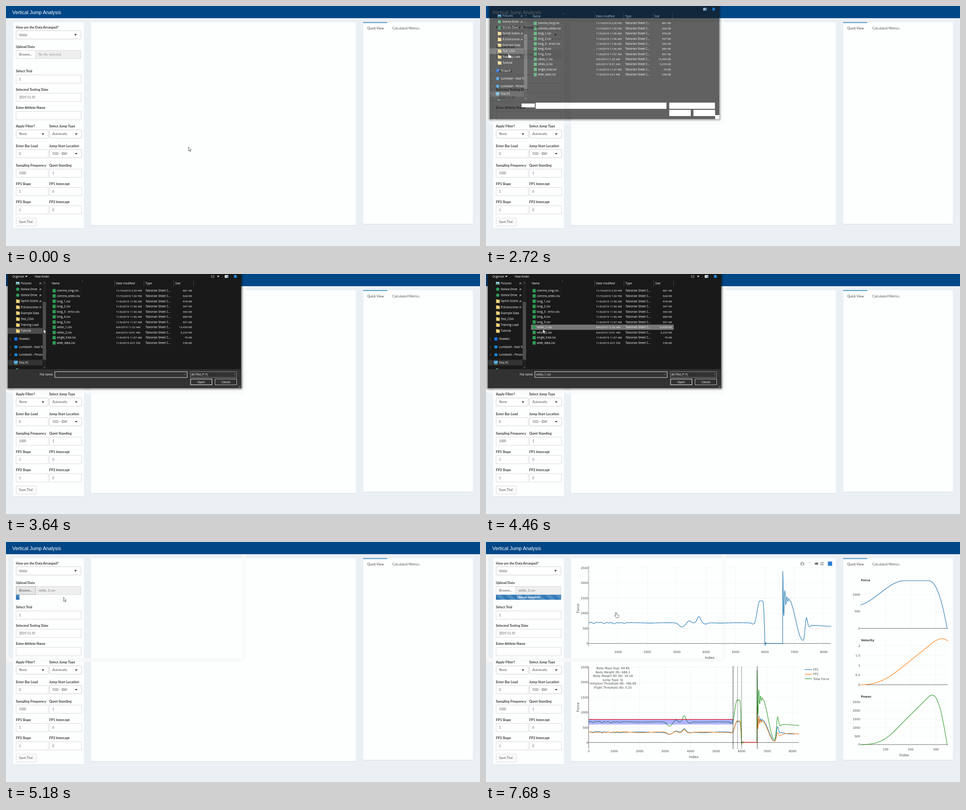
Animation, 1053 px wide and 532 px high, one loop 8000 ms. Source, as an HTML page:

```html
<!DOCTYPE html>
<html lang="en">
<head>
<meta charset="utf-8">
<title>Vertical Jump Analysis</title>
<style>
html, body { margin: 0; width: 100%; height: 100%; overflow: hidden; background: #ebf0f4; }
svg { display: block; }
text { font: 7.4px Lato, sans-serif; fill: #555; }
.label { font-weight: 700; font-size: 7.5px; fill: #333; }
.num { font-size: 6.7px; }
.title { font: 10.9px "Liberation Sans", Arial, sans-serif; fill: #fff; }
.done { font-weight: 700; font-size: 6.7px; fill: #fff; }
.plot text { font: 6.58px "DejaVu Sans", sans-serif; fill: #444; }
.plot .axis { font-size: 7.68px; }
.plot .head { font-weight: 700; fill: #333; }
.win text { font: 6.3px "Open Sans", sans-serif; fill: #fff; }
.win .date { font-size: 6.15px; }
.mid { text-anchor: middle; }
.end { text-anchor: end; }
</style>
</head>
<body>
<svg id="stage" width="1053" height="532" viewBox="0 0 1053 532"></svg>
<script>
const LOOP = 8000;
const text = (x, y, s, cls = '', more = '') => `<text x="${x}" y="${y}" class="${cls}" ${more}>${s}</text>`;
const rect = (x, y, w, h, fill = '#fff', more = '') =>
  `<rect x="${x}" y="${y}" width="${w}" height="${h}" fill="${fill}" ${more}/>`;
const path = (d, stroke, width = 1, more = '') =>
  `<path d="${d}" fill="none" stroke="${stroke}" stroke-width="${width}" ${more}/>`;
const caret = (x, y, fill = '#222') => `<path d="M${x - 3} ${y - 1.5}h6l-3 3.2z" fill="${fill}"/>`;
const group = (id, body, more = '') => `<g id="${id}" ${more}>${body}</g>`;
const range = (a, b, step) => Array.from({ length: Math.floor((b - a) / step + 1e-6) + 1 }, (_, i) => a + i * step);
const clamp = v => Math.max(0, Math.min(1, v));
const smooth = (a, b, x) => { const u = clamp((x - a) / (b - a)); return u * u * (3 - 2 * u); };
const bell = (x, center, width) => Math.exp(-(((x - center) / width) ** 2));

// ---- Form ----
const panel = (x, y, w, h) => rect(x, y + .8, w, h, '#d3d9de') + rect(x, y, w, h, '#fdfefe');
const field = (x, w, y, value, select) =>
  rect(x + .5, y - 9.2, w - 1, 18.4, '#fff', select ? 'stroke="#bfc1c4" stroke-width=".8" rx="2"' : 'stroke="#d2d6de" stroke-width=".9"') +
  text(x + 7, y + 2.5, value, /^[\d-]+$/.test(value) ? 'num' : '') +
  (select ? caret(x + w - 12.5, y) : '');
const label = (x, y, s) => text(x, y + 2.6, s, 'label');
const pair = (y, a, b, left, right, selA, selB) =>
  label(22, y, a) + label(96, y, b) + field(22, 72.5, y + 17.4, left, selA) + field(96, 72.5, y + 17.4, right, selB);

const panels = panel(16, 36, 157, 457) + panel(189, 36, 588, 450) + panel(793.5, 36, 243.5, 447);

const form =
  rect(0, 0, 1053, 27, '#004787') + text(14, 17.6, 'Vertical Jump Analysis', 'title') +
  rect(793.5, 35.8, 53.5, 1.8, '#3c8dbc') +
  text(802.5, 51.6, 'Quick View', '', 'style="fill:#444"') + text(858, 51.6, 'Calculated Metrics') +
  label(22, 47, 'How are the Data Arranged?') + field(22, 145, 64, 'Veldo', true) +
  label(22, 90, 'Upload Data') +
  rect(65.5, 98.5, 101, 18, '#eee', 'stroke="#d2d6de" stroke-width=".9"') +
  rect(22.5, 98.5, 43, 18, '#fff', 'id="browse" stroke-width=".9"') +
  text(29, 110.4, 'Browse...') + text(72, 110.4, '', '', 'id="upload"') +
  label(22, 144.5, 'Select Trial') + field(22, 145.5, 162, '1') +
  label(22, 185, 'Selected Testing Date') + field(22, 145.5, 202.5, '2019-11-19') +
  label(22, 225.7, 'Enter Athlete Name') + field(22, 145.5, 243, '') +
  pair(266.5, 'Apply Filter?', 'Select Jump Type', 'None', 'Automatic', true, true) +
  pair(310, 'Enter Bar Load', 'Jump Start Location', '0', '5SD - BW', false, true) +
  pair(353.2, 'Sampling Frequency', 'Quiet Standing', '1000', '1') +
  pair(394, 'FP1 Slope', 'FP1 Intercept', '1', '0') +
  pair(434.6, 'FP2 Slope', 'FP2 Intercept', '1', '0') +
  rect(22.5, 469.8, 44.6, 18, '#fbfbfb', 'rx="2" stroke="#d9d9d9" stroke-width=".9"') + text(29, 481.4, 'Save Trial') +
  group('progress', rect(22, 117, 145, 11, '#337ab7', 'id="bar"') + rect(22, 117, 145, 11, 'url(#stripes)', 'id="barStripes"') +
    text(94.5, 125, 'Upload complete', 'done mid'));

// ---- File window ----
const files = `comma_long|11/10/2019 2:29 PM|881
comma_veldo|11/10/2019 1:50 PM|928
long_1|11/6/2019 11:06 AM|678
long_2|11/6/2019 11:06 AM|597
long_3 - error|11/6/2019 11:06 AM|440
long_4|11/6/2019 11:06 AM|889
long_5|11/6/2019 11:07 AM|901
veldo_1|6/6/2019 11:22 AM|13,459
veldo_2|6/6/2019 10:51 AM|5,233
single_trial|11/6/2019 11:07 AM|79
wide_data|11/6/2019 4:01 PM|538`.split('\n').map((line, i) => {
  const [name, date, size] = line.split('|'), y = 37.2 + i * 11.55;
  return rect(103.5, y - 3.8, 7, 7.6, '#2f9a55') + text(113, y + 2.2, name + '.csv') + text(244.5, y + 2.2, date, 'date') +
    text(310, y + 2.2, 'Talvorian Sheet C...') + text(413, y + 2.2, size + ' KB', 'date end');
}).join('');

const folder = y => `<path d="M22.5 ${y - 4}h3l1 1h4v7h-8z" fill="#f3d67c"/>`;
const disc = (x, y, c) => `<circle cx="${x}" cy="${y}" r="3.6" fill="${c}"/>`;
const pin = y => path(`M74 ${y + 2.5}l2-2m-1.5-1.5l3 3m-1.5-4l3 3m-2.2-2l-1 1`, '#ccc', .9);
const places = ['Pictures', 'Nolvra Drive', 'Nolvra Drive', 'Sports Scienc', 'R Environmer', 'Example Data', 'Test_CSVs', 'Training Load', 'Tutorial'];
const roots = ['Stowbin', 'Lumstash - East Te', 'Lumstash - Person', 'This PC'];
const sidebar = places.map((name, i) => {
  const y = 20.6 + i * 13.2;
  const icon = i === 0 ? rect(22, y - 3, 8, 6.5, '#9fd0ee') + `<path d="M22 ${y + 3.5}l3-4 2 2 1-1 2 3z" fill="#3d7d4a"/>`
    : i < 3 ? disc(26, y, '#2f9e5b') : folder(y);
  return icon + text(33, y + 2.2, name) + (i < 5 ? pin(y) : '');
}).join('') + rect(4, 190.3, 77, 12.4, '#333') +
  roots.map((name, i) => {
    const y = 144 + i * 17.5;
    const icon = i === 0 ? rect(18.5, y - 3.5, 7, 7, '#1673e6') : i < 3 ? disc(22, y, '#1685d8')
      : rect(17.5, y - 4, 8.5, 6, '#55b4e8') + rect(19, y + 3, 5.5, 1, '#9cc');
    return path(`M9 ${y - 2}l2 2-2 2`, '#888', .7) + text(29, y + 2.2, name) + icon;
  }).join('') +
  rect(81.5, 15, 7.5, 195, '#202020') + rect(81.5, 62, 7.5, 128, '#4d4d4d') +
  path('M83.5 20.5l1.8-1.8 1.8 1.8M83.5 206l1.8 1.8 1.8-1.8', '#aaa', .7) + rect(22, 209.5, 5, 1.5, '#4db3a0');

const controls = (fill, strokes) => strokes.map((s, i) => {
  const x = [108.5, 410, 410, 464.5][i], w = [294, 102, 47.5, 48][i];
  return rect(x, i < 2 ? 216.5 : 232.8, w, 12.8, fill, `stroke="${s}"`);
}).join('');
const shadow = range(2, 10, 2).map(w => rect(4, -20, 518.5, 273, 'none', `rx="2" stroke="#000" stroke-width="${w}" opacity=".09"`)).join('');
const fileWindow = shadow +
  rect(4, -20, 518.5, 273, '#191919') + rect(0, 0, 0, 0, '#4d4d4d', 'id="hover"') + sidebar + files +
  text(101.5, 23.4, 'Name') + text(244.5, 23.4, 'Date modified') + text(310, 23.4, 'Type') + text(376, 23.4, 'Size') +
  path('M241.5 14v14M306.5 14v14M372.5 14v14M416.5 14v14', '#555', .8) + path('M168 16.5l1.8-1.6 1.8 1.6', '#aaa', .6) +
  rect(486, 2.5, 8, 6, '#eee') + rect(490.5, 4, 3, 4, '#4a90d0') +
  disc(509.5, 5.5, '#0b78d0') + text(509.5, 7.8, '?', 'mid') +
  group('ready',
    rect(4, 211, 518.5, 42, '#323232') + text(14, 7.6, 'Organize') + caret(45, 5.5, '#ddd') + text(64, 7.6, 'New folder') +
    path('M455.5 3.5h3m-3 2.2h3m-3 2.2h3m1.5-4.4h3m-3 2.2h3m-3 2.2h3', '#ccc', .8) + caret(471.5, 5.5, '#ddd') +
    controls('none', ['#ddd', '#888', '#fff', '#bbb']) + text(105, 225, 'File name:', 'end') + text(111, 225, '', '', 'id="fileName"') +
    rect(110.3, 219, .8, 9, '#fff', 'id="textCaret"') +
    text(412, 225, 'All Files (*.*)') + path('M396 222l1.8 1.8 1.8-1.8M506 222l1.8 1.8 1.8-1.8', '#bbb', .7) +
    text(433.5, 241.6, 'Open', 'mid') + text(488.5, 241.6, 'Cancel', 'mid') + path('M516 252l5-5m-2.5 5l2.5-2.5', '#bbb', .7)) +
  group('blank', controls('#fff', Array(4).fill('#fff')) + rect(76, 218, 30, 8.5) + rect(513, 244, 9.5, 9));

// ---- Jump model: quiet standing, push-off, flight, landing ----
const MASS = 69.94, WEIGHT = 686.1, PUSH = 5650, TAKEOFF = 5998, IMPACT = 6606;
const standing = i => 683 + 25 * Math.sin(i / 37) * Math.sin(i / 110) * (1 - smooth(900, 1700, i)) + 6 * Math.sin(i / 190) -
  130 * bell(i, 3170, 130) + 75 * bell(i, 3420, 80) + 200 * bell(i, 3750, 80) - 45 * bell(i, 3980, 90) - 35 * bell(i, 5590, 45);
const push = k => (670 + 740 * smooth(-20, 175, k)) * (1 - clamp((k - 270) / 75) ** 2.2);
const flight = u => -75 * Math.exp(-u / 30) * Math.cos(u / 9);
const landing = i => 1450 - 1340 * smooth(6810, 7280, i) + 490 * smooth(7300, 7410, i) - 30 * smooth(7600, 8250, i) +
  250 * bell(i, 7410, 45) - 50 * bell(i, 7510, 50) + 940 * Math.exp(-(i - IMPACT) / 60) * Math.cos((i - IMPACT) / 11);
const force = i => i < PUSH ? standing(i) : i < TAKEOFF ? push(i - PUSH) : i < IMPACT ? flight(i - TAKEOFF) : landing(i);
const share = i => .5 + .018 * Math.sin(i / 260) + .12 * bell(i, 7400, 250);
let speed = 0;
const speeds = range(0, 348, 1).map(k => speed += (push(k) - WEIGHT) / MASS / 1000);

// ---- Charts ----
const BLUE = '#1f77b4', ORANGE = '#ff7f0e', GREEN = '#2ca02c';
const trace = ({ l, kx, y0, ky }, f, color, last = 8250, step = 6) =>
  path('M' + range(0, last, step).map(i => `${(l + i * kx).toFixed(2)} ${(y0 - f(i) * ky).toFixed(2)}`).join('L'),
    color, 1.15, 'stroke-linejoin="round"');
function axes({ l, r, t, b, kx, y0, ky, xs, ys, tickY }) {
  const px = v => l + v * kx, py = v => y0 - v * ky;
  return xs.map(v => path(`M${px(v)} ${t}V${b}`, '#eee', .6) + (tickY ? text(px(v), tickY, v, 'mid') : '')).join('') +
    ys.map(v => path(`M${l} ${py(v)}H${r}`, '#eee', .6) + text(l - .8, py(v) + 2.4, v, 'end')).join('') +
    path(`M${l} ${y0}H${r}`, '#444', .8);
}
const upright = y => text(0, 0, 'Force', 'axis mid', `transform="translate(207 ${y}) rotate(-90)"`);
const forces = range(0, 2500, 500);
const top1 = { l: 228, r: 766, t: 53, b: 232, kx: .0653, y0: 225, ky: .067, xs: range(1000, 8000, 1000), ys: forces, tickY: 245.6 };
const low = { l: 228, r: 695, t: 276, b: 458, kx: .05665, y0: 444.5, ky: .0668, xs: range(0, 8000, 1000), ys: forces, tickY: 465.6 };

const topPlot = axes(top1) + path('M228 53V232', '#444', .6) + trace(top1, force, BLUE) + upright(147) + text(497, 259, 'Index', 'axis mid') +
  rect(698.5, 45.5, 8.5, 6, '#aaa', 'rx="1"') + rect(701, 44.3, 3.5, 2, '#aaa') + '<circle cx="702.7" cy="48.5" r="1.8" fill="#fff"/>' +
  path('M716 45h6v6', '#bbb', 1, 'stroke-dasharray="1.5 1"') + '<path d="M729.5 48l2.5-2.5h6v5h-6z" fill="#777"/>' +
  rect(742.5, 45, 8, 2.4, '#aaa') + rect(742.5, 49, 8, 2.4, '#aaa') + rect(759.5, 43.3, 9.5, 9.5, '#2f7fd6');

const facts = ['Body Mass (kg): 69.94', 'Body Weight (N): 686.1', 'Body Weight SD (N): 16.18', 'Jump Type: SJ',
  'Initiation Threshold (N): 766.99', 'Flight Threshold (N): 5.25'];
const events = [PUSH, PUSH + 32, PUSH + 190, TAKEOFF, IMPACT, IMPACT + 14];
const lowPlot = axes(low) + path('M228 276V458', '#444', .8) +
  trace(low, i => force(i) * share(i), BLUE) + trace(low, i => force(i) * (1 - share(i)), ORANGE) + trace(low, force, GREEN) +
  rect(228, 393.5, 321, 11, '#00f', 'opacity=".3"') + path('M228 393.3H549M568 444.2H602.5', '#e00010', 1.3) +
  events.map(i => path(`M${low.l + i * low.kx} 276V458`, '#222', 1, 'stroke-dasharray="1.7 1.7"')).join('') +
  facts.map((s, i) => text(282, 282.2 + i * 8.55, s, 'mid')).join('') +
  [['FP1', BLUE], ['FP2', ORANGE], ['Total Force', GREEN]].map(([s, c], i) =>
    path(`M708 ${282.8 + i * 10.2}h16`, c, 1.2) + text(727, 285.2 + i * 10.2, s)).join('') +
  upright(366) + text(461.5, 479, 'Index', 'axis mid');

function side(name, t, y0, ky, ys, color, f, tickY) {
  const c = { l: 832, r: 1026, t, b: y0 + 5, kx: .5575, y0, ky, xs: [100, 200, 300], ys, tickY };
  return axes(c) + trace(c, f, color, 348, 1) + text(833, t + 6.6, name, 'head');
}
const sidePlots =
  side('Force', 80, 191.5, .075, [0, 500, 1000], BLUE, push) +
  side('Velocity', 213, 316.5, 43.2, range(0, 2, .5), ORANGE, k => speeds[k]) +
  side('Power', 338, 449, .0376, forces, GREEN, k => push(k) * speeds[k], 462.4) +
  text(929, 475.2, 'Index', 'axis mid');

// ---- Stage ----
const stage = document.getElementById('stage');
stage.innerHTML =
  `<defs><pattern id="stripes" x="22" y="117" width="22" height="22" patternUnits="userSpaceOnUse">
    <path d="M0 0h11l11 11v11zM0 11l11 11H0z" fill="#fff" opacity=".15"/></pattern></defs>` +
  panels + group('halo', rect(1, -20, 528.5, 281.5, 'none', 'rx="11" stroke="#f8f9fa" stroke-width="9" opacity=".85"')) + form +
  group('topPlot', topPlot, 'class="plot"') + group('lowPlot', lowPlot, 'class="plot"') + group('sidePlots', sidePlots, 'class="plot"') +
  group('fileWindow', fileWindow, 'class="win"') +
  group('cursor',
    '<path id="arrow" d="M.4.5v9l2.1-1.9 1.4 3.1 1.4-.6-1.3-3h2.7z" fill="#fff" stroke="#222" stroke-width=".7"/>' +
    '<path id="hand" d="M.3 0q1.2 0 1.2 1.2v3.6l4 .9q1.2.3 1.1 1.6L6 10.6q-.2 1.2-1 1.2H1.2q-.6 0-1-.6l-2.6-3.4q-.7-1.2.4-1.4l1.2.8V1.2Q-.8 0 .3 0z" fill="#fff" stroke="#222" stroke-width=".7"/>');
const el = {};
stage.querySelectorAll('[id]').forEach(node => el[node.id] = node);
const show = (id, on) => el[id].setAttribute('display', on ? 'inline' : 'none');
const set = (id, attrs) => { for (const k in attrs) el[id].setAttribute(k, attrs[k]); };

// Cursor moves: from, until, x, y
const moves = [[430, 840, 52, 72], [1350, 1620, 48, 130], [1650, 1910, 50, 104], [3490, 3640, 83, 122],
  [3640, 3950, 126, 122], [5150, 5720, 288.5, 162], [6100, 6190, 288.5, 156]];
const cursorAt = t => moves.reduce(([x, y], [from, until, toX, toY]) => {
  const u = smooth(from, until, t);
  return [x + (toX - x) * u, y + (toY - y) * u];
}, [405, 312]);

function draw(t) {
  const [x, y] = cursorAt(t);
  const opened = 1 - (1 - clamp((t - 2645) / 240)) ** 3, closed = clamp((t - 4930) / 180);
  const zoom = s => `translate(263 108) scale(${s}) translate(-263 -108)`;
  const openScale = .95 + .05 * opened;

  set('cursor', { transform: `translate(${x} ${y})` });
  const hand = t >= 7400 || (t < 2880 && x < 66 && y > 97 && y < 117);
  show('hand', hand);
  show('arrow', !hand);

  show('fileWindow', opened > 0 && closed < 1);
  set('fileWindow', { opacity: opened * (1 - closed), transform: zoom(openScale - .047 * closed) });
  show('halo', opened > 0);
  set('halo', { transform: zoom(openScale), opacity: opened });
  show('ready', t >= 2800);
  show('blank', t < 2800);

  const selected = t >= 4250;
  if (x < 90) set('hover', { x: 4, y: 93.5 + 13 * Math.floor((y - 93.5) / 13), width: 77, height: 13 });
  else set('hover', { x: 100, y: 31.4 + 11.55 * Math.floor((y - 31.4) / 11.55), width: 317, height: 11.5 });
  set('hover', { fill: selected ? '#777' : '#4d4d4d' });
  el.fileName.textContent = selected ? 'veldo_1.csv' : '';
  show('textCaret', !selected && (t < 3260 || t >= 3790));

  const hot = t >= 1470 && t < 5600;
  set('browse', { fill: hot ? '#e6e6e6' : '#fff', stroke: hot ? '#adadad' : '#d2d6de' });
  const chosen = t >= 4980;
  el.upload.textContent = chosen ? 'veldo_1.csv' : 'No file selected';
  el.upload.style.fill = chosen ? '#777' : '#999';
  const width = 145 * clamp((t - 5150) / 560);
  show('progress', width > 0);
  set('bar', { width });
  set('barStripes', { width });

  show('topPlot', t >= 7400);
  show('lowPlot', t >= 7500);
  show('sidePlots', t >= 7590);
}

const start = performance.now();
function tick() {
  draw((performance.now() - start) % LOOP);
  requestAnimationFrame(tick);
}
tick();
</script>
</body>
</html>
```
